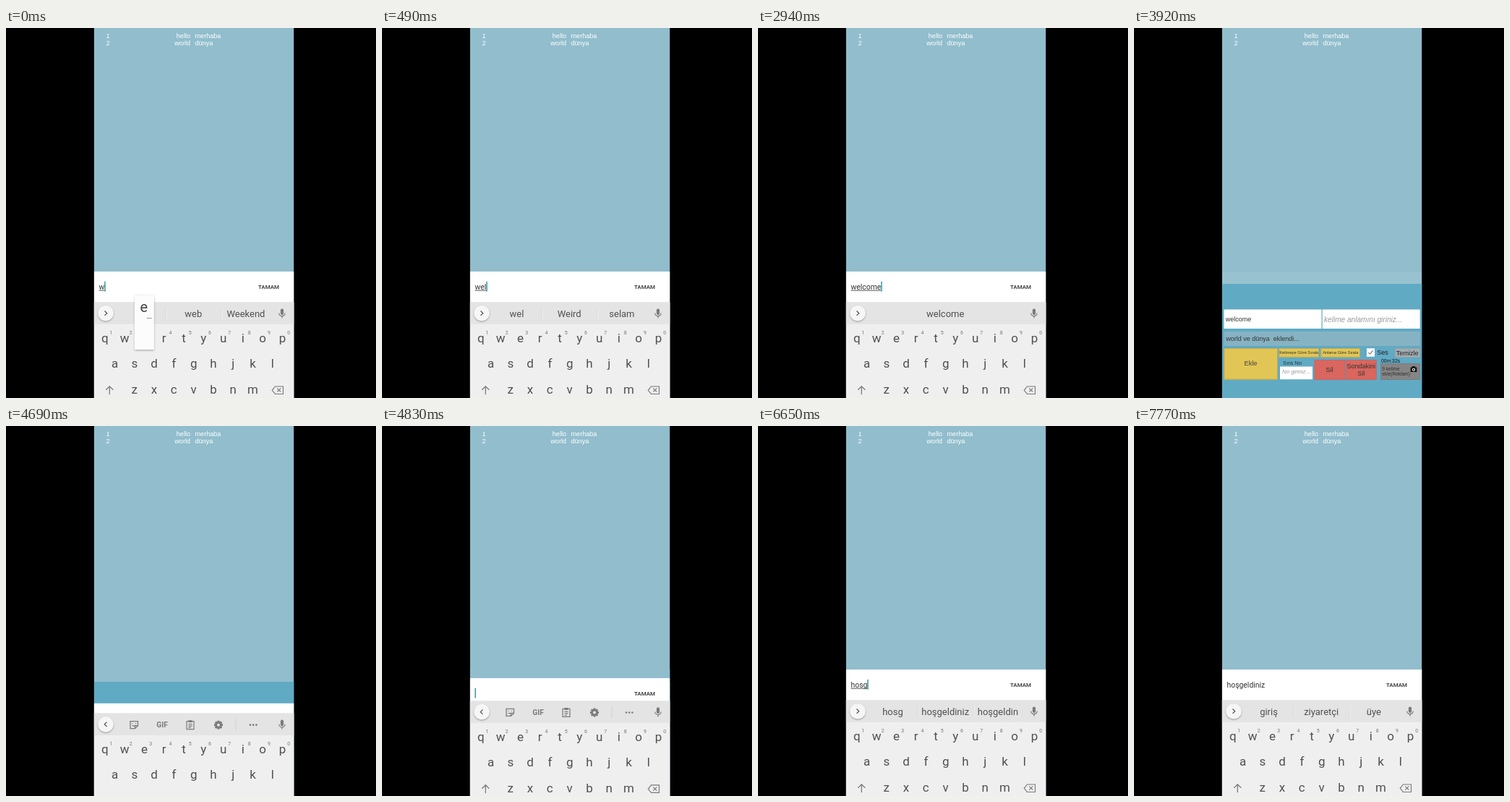
An HTML page with a canvas for the animation above (8000 ms loop, 512 by 512 pixels).

```html
<!DOCTYPE html>
<html lang="tr">
<head>
<meta charset="utf-8">
<title>Kelime defteri</title>
<style>
html, body { margin: 0; width: 100%; height: 100%; overflow: hidden; background: #000; }
canvas { display: block; width: 512px; height: 512px; }
</style>
</head>
<body>
<canvas id="stage" width="512" height="512"></canvas>
<script>
const c = document.getElementById('stage').getContext('2d');
const LOOP = 8000, LEFT = 121.7, WIDTH = 276.8;
const SANS = '"Liberation Sans", Arial, sans-serif', ROBOTO = 'Roboto, sans-serif';
const ROWS = ['qwertyuiop', 'asdfghjkl', 'zxcvbnm'];
const ROW_X = [136.8, 150.5, 177.7], PITCH = 27.3, ROW_H = 35.6;
const ICON = '#7b7b7b';

// [start, typed text, suggestions, finished word?]
const TYPED = [
  [0, 'w', ['w', 'web', 'Weekend']],
  [140, 'we', ['we', 'web', 'well']],
  [420, 'wel', ['wel', 'Weird', 'selam']],
  [1890, 'welc', ['welc', 'welcome', 'velcro']],
  [2100, 'welco', ['welco', 'welcome', 'velcro']],
  [2590, 'welcom', ['welcom', 'welcome', 'velcro']],
  [2870, 'welcome', ['', 'welcome', '']],
  [4480, '', null],
  [5390, 'h', ['h', 'hadi', 'ha']],
  [5600, 'ho', ['ho', 'hi', 'hocam']],
  [5880, 'hos', ['hos', 'hoş', 'host']],
  [6440, 'hosg', ['hosg', 'hoşgeldiniz', 'hoşgeldin']],
  [7140, 'hoşgeldiniz ', ['giriş', 'ziyaretçi', 'üye'], true]
];
// [key, press, release]
const PRESSES = [
  ['e', 0, 140], ['l', 280, 420], ['c', 1750, 1890], ['o', 1960, 2100], ['m', 2450, 2590],
  ['e', 2800, 2940], ['h', 5250, 5390], ['o', 5460, 5600], ['s', 5740, 5880], ['g', 6300, 6440]
];
const CARET_OFF = [[910, 1050], [1540, 1890], [3500, 3850], [7000, 7140], [7770, 8000]];

const within = (t, a, b) => t >= a && t < b;
const easeOut = (t, start, length) => 1 - (1 - Math.min(1, Math.max(0, (t - start) / length))) ** 3;

function box(x, y, w, h, color) {
  c.fillStyle = color;
  c.fillRect(x, y, w, h);
}
function text(s, x, y, font, color, align = 'left') {
  c.font = font;
  c.fillStyle = color;
  c.textAlign = align;
  c.fillText(s, x, y);
}
const sans = (s, x, y, size, color = '#333', align, style = '') =>
  text(s, x, y, `${style} ${size}px ${SANS}`, color, align);
const roboto = (s, x, y, size, color, align, weight = 400) =>
  text(s, x, y, `${weight} ${size}px ${ROBOTO}`, color, align);
function line(d, color, width = 1) {
  c.strokeStyle = color;
  c.lineWidth = width;
  c.stroke(new Path2D(d));
}
function disc(x, y, r, color) {
  c.fillStyle = color;
  c.beginPath();
  c.arc(x, y, r, 0, 7);
  c.fill();
}
function shadowed(blur, dy, draw) {
  c.save();
  c.shadowColor = 'rgba(0,0,0,.35)';
  c.shadowBlur = blur;
  c.shadowOffsetY = dy;
  draw();
  c.restore();
}
function button(x, y, w, h, color, edge) {
  box(x, y, w, h, color);
  c.strokeStyle = edge;
  c.lineWidth = 1;
  c.strokeRect(x + .5, y + .5, w - 1, h - 1);
}

function wordList() {
  box(LEFT, 0, WIDTH, 512, '#91bdcd');
  [['hello', 'merhaba'], ['world', 'dünya']].forEach(([word, meaning], i) => {
    const y = 14 + i * 10.4;
    sans(i + 1, 138.5, y, 9.1, '#fff');
    sans(word, 255, y, 9.1, '#fff', 'right');
    sans(meaning, 261.5, y, 9.1, '#fff');
  });
}

function form(t) {
  box(LEFT, 354, WIDTH, 158, '#60aac4');
  box(LEFT, 338, WIDTH, 16, `rgba(255,255,255,${.07 * Math.max(0, 1 - (t - 3920) / 500)})`);
  box(124.5, 389.5, 135, 26.5, '#fff');
  box(260.7, 389.5, 135, 26.5, '#fff');
  sans('welcome', 126.7, 406.3, 9);
  sans('kelime anlamını giriniz...', 263, 406.5, 10.1, '#999', 'left', 'italic');
  box(124.5, 420, 271.5, 20, '#86b3c3');
  sans('world ve dünya  eklendi...', 127.3, 433, 9);

  button(124.5, 443, 74.5, 43.5, '#e2c655', '#c2aa50');
  sans('Ekle', 161.5, 467.3, 9.3, '#444', 'center');
  button(200.5, 443, 55.5, 12.7, '#e2c655', '#c2aa50');
  sans('Kelimeye Göre Sırala', 228.2, 451.3, 5.7, '#333', 'center');
  button(258.5, 443, 54.5, 12.7, '#e2c655', '#c2aa50');
  sans('Anlama Göre Sırala', 285.7, 451.3, 5.6, '#333', 'center');
  box(322, 443.3, 11, 11.5, '#fff');
  line('M324.5 449l2 2.3 4-5', '#444');
  sans('Ses', 336.3, 452.3, 9, '#222');
  button(361, 443.3, 35, 12.5, '#a4adb1', '#98a1a5');
  sans('Temizle', 378.2, 452.5, 9.1, '#222', 'center');

  sans('Sıra No', 206, 466.3, 7.7);
  box(202, 468.5, 45, 17.7, '#fff');
  sans('No giriniz...', 205, 477.5, 7.8, '#999', 'left', 'italic');
  button(249.5, 459, 42.5, 28, '#d9665f', '#bd6967');
  sans('Sil', 270.5, 476.3, 9, '#333', 'center');
  button(292.7, 459, 43, 28, '#d9665f', '#bd6967');
  sans('Sondakini', 314.2, 471.3, 9, '#333', 'center');
  sans('Sil', 314.2, 481.3, 9, '#333', 'center');
  sans('00m:32s', 342, 462.5, 6.8, '#111');
  button(341, 464, 55, 23, '#858585', '#757f83');
  sans('9 kelime', 343.2, 473.5, 6.6);
  sans('ekle(Reklam)', 343.2, 481.3, 6.6);
  box(385, 468, 4, 2, '#111');
  box(382.7, 469.5, 8.6, 6.5, '#111');
  disc(387, 472.8, 2.1, '#fff');
  disc(387, 472.8, 1.1, '#111');
}

function panel(t, word, done) {
  box(LEFT, 337, WIDTH, 175, '#fff');
  roboto(word, 128.5, 361.7, 10.4, '#333');
  const w = c.measureText(word).width;
  if (word && !done) box(128.5, 362.8, w, .8, '#333');
  if (!CARET_OFF.some(([a, b]) => within(t, a, b))) box(128.5 + w, 350.8, 1.3, 13.8, '#138a96');
  roboto('TAMAM', 363.5, 361.3, 8, '#2c2c2c', 'center', 500);
}

function toolbar() {
  line('M172 390.5h10.5v6l-4 4h-6.5zM178.5 400.5v-4h4M174.5 393.5h1M179 393.5h1M174.5 396q2.5 2 4 0', ICON, 1.3);
  roboto('GIF', 216, 399.2, 10.3, ICON, 'center', 700);
  line('M250 390.5h10v11h-10zM252.5 394.5h5M252.5 397h5M252.5 399.3h3.5', ICON, 1.2);
  box(252.5, 389, 5, 3, ICON);
  for (let i = 0; i < 4; i++) {
    c.save();
    c.translate(294, 395.5);
    c.rotate(i * Math.PI / 4);
    box(-1.5, -6, 3, 12, ICON);
    c.restore();
  }
  disc(294, 395.5, 4.6, ICON);
  disc(294, 395.5, 2, '#e4e4e4');
  box(317.5, 387, 1, 17, '#d2d2d2');
  for (const x of [338, 342.2, 346.4]) disc(x, 395.5, 1.3, ICON);
}

function suggestions(words) {
  words.forEach((s, i) => roboto(s, 186.5 + i * 72.7, 399.7, 13, '#505050', 'center'));
  if (words[0]) for (const x of [220.5, 297.5]) {
    box(x, 387, 1, 16.5, '#d5d5d5');
    box(x + 1, 387, 1, 16.5, '#efefef');
  }
}

function keyboard(words) {
  box(LEFT, 379.3, WIDTH, 133, '#efefef');
  box(LEFT, 379.3, WIDTH, 30.5, '#e4e4e4');
  shadowed(2, 1, () => disc(138, 394.7, 10.8, '#f6f6f6'));
  line(words ? 'M136.5 391.5l3.2 3.2-3.2 3.2' : 'M139.5 391.5l-3.2 3.2 3.2 3.2', '#555', 1.3);
  words ? suggestions(words) : toolbar();
  c.lineCap = 'round';
  line('M382 390.5v4.5', ICON, 4.2);
  c.lineCap = 'butt';
  line('M377.8 394.5a4.2 4.2 0 0 0 8.4 0M382 398.5v3', ICON, 1.2);

  ROWS.forEach((row, r) => [...row].forEach((key, i) => {
    const x = ROW_X[r] + i * PITCH;
    roboto(key, x, 434.7 + r * ROW_H, 17, '#505050', 'center');
    if (!r) roboto((i + 1) % 10, x + 8.7, 423.6, 7, '#777', 'center');
  }));
  line('M143.3 507.3v-11M138.3 500.8l5-5 5 5', ICON, 1.3);
  line('M372.5 496h11v10.5h-11l-4.2-5.2zM375.3 498.7l5 5M380.3 498.7l-5 5', ICON, 1.2);
}

function popup(key) {
  const r = ROWS.findIndex(row => row.includes(key));
  const x = ROW_X[r] + ROWS[r].indexOf(key) * PITCH, y = 370 + r * ROW_H;
  shadowed(3, 1, () => box(x - 13.5, y, 27, 75, '#fcfcfc'));
  roboto(key, x - .5, y + 22.7, 20, '#444', 'center');
  if ('eocsg'.includes(key)) for (let i = 0; i < 3; i++) disc(x + 4.5 + i * 2.3, y + 31.5, .7, '#555');
}

function shifted(dy, draw) {
  c.save();
  c.translate(0, dy);
  draw();
  c.restore();
}

function draw(t) {
  const [, word, words, done] = TYPED.filter(s => s[0] <= t).pop();
  const closing = within(t, 3850, 4480);
  // The text panel settles a little later than the keyboard.
  let panelY = 0, keysY = 0;
  if (closing) panelY = keysY = 180 * easeOut(t, 3780, 140);
  else if (within(t, 4480, 5110)) {
    panelY = 175 * (1 - easeOut(t, 4480, 593));
    keysY = 133 * (1 - easeOut(t, 4480, 435));
  }

  box(0, 0, 512, 512, '#000');
  c.save();
  c.beginPath();
  c.rect(LEFT, 0, WIDTH, 512);
  c.clip();
  wordList();
  if (within(t, 3850, 5110)) form(t);
  if (panelY < 175) {
    if (panelY < 20) box(LEFT, 337, WIDTH, panelY, '#91bdcd');
    shifted(panelY, () => panel(t, word, done));
    shifted(keysY, () => keyboard(words));
  }
  const press = PRESSES.find(p => within(t, p[1], p[2]));
  if (press) popup(press[0]);
  c.restore();
}

const begin = performance.now();
function tick() {
  draw((performance.now() - begin) % LOOP);
  requestAnimationFrame(tick);
}
tick();
</script>
</body>
</html>
```
